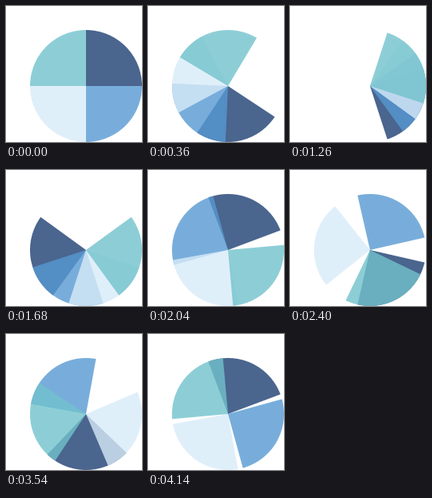
A matplotlib script that plays this animation: 170 px wide and 170 px high, repeating every 4200 ms.

```python
import matplotlib.pyplot as plt
from matplotlib.animation import FuncAnimation
from matplotlib.patches import Wedge

SIZE, DPI = 170, 100
CENTER, RADIUS = (100, 100), 70
FRAMES, INTERVAL = 70, 60

# Bottom to top: colour and full turns per loop
QUARTERS = [("#1d3f72", 4), ("#5699d2", 3), ("#d8ebf9", 2), ("#71c2cc", 1)]

fig = plt.figure(figsize=(SIZE / DPI, SIZE / DPI), dpi=DPI, facecolor="white")
ax = fig.add_axes([0, 0, 1, 1])
ax.set_xlim(0, SIZE)
ax.set_ylim(SIZE, 0)
ax.axis("off")

wedges = [
    ax.add_patch(Wedge(CENTER, RADIUS, 0, 90, facecolor=color, alpha=0.8, linewidth=0))
    for color, _ in QUARTERS
]


def update(frame):
    # The y axis points down, so growing angles turn clockwise
    for i, (wedge, (_, turns)) in enumerate(zip(wedges, QUARTERS)):
        start = (90 * (i - 1) + 360 * turns * frame / FRAMES) % 360
        wedge.set_theta1(start)
        wedge.set_theta2(start + 90)
    return wedges


anim = FuncAnimation(fig, update, frames=FRAMES, interval=INTERVAL, repeat=True, repeat_delay=0)
plt.show()
```
